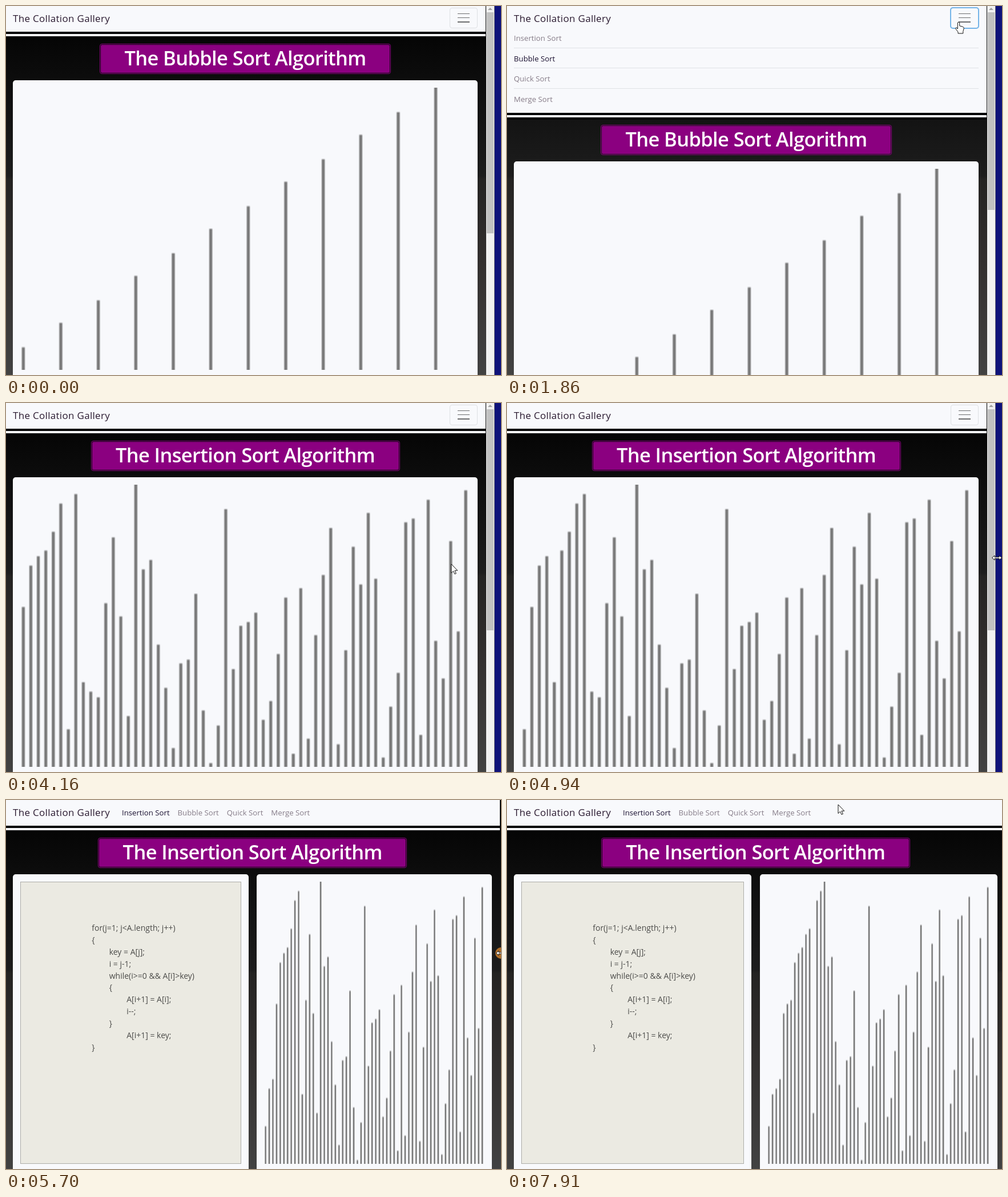
These frames come from a looping animation (867x646 px, 8 s). An HTML page with a canvas:

```html
<!DOCTYPE html>
<html lang="en">
<head>
<meta charset="utf-8">
<title>Sorting visualiser</title>
<style>
  * { box-sizing: border-box; }
  html, body { margin: 0; width: 100%; height: 100%; overflow: hidden; }
  body { font-family: "Open Sans", "Noto Sans", sans-serif; }
  #stage {
    position: relative; width: 867px; height: 646px; overflow: hidden;
    background: linear-gradient(#000, #1d1d1d 46%, #242322 47%, #33302f 70%, #424242);
  }
  #page { position: absolute; left: 0; top: 0; height: 646px; overflow: hidden; }
  nav {
    position: relative; box-sizing: content-box; height: 45px; overflow: hidden;
    background: #f8f9fc; border-bottom: 12px double #000;
  }
  .brand {
    position: absolute; left: 12px; top: 0; line-height: 44px;
    font-size: 17px; letter-spacing: .3px; color: #2a1a30; white-space: nowrap;
  }
  .toggle {
    position: absolute; right: 14px; top: 3px; width: 49px; height: 36px;
    border: 1px solid #dee0e3; border-radius: 4px;
  }
  .toggle::before {
    content: ""; position: absolute; left: 13px; top: 9px; width: 21px; height: 16px;
    background: linear-gradient(#6c6c6e 1.5px, transparent 1.5px 7px, #6c6c6e 7px 8.5px,
                transparent 8.5px 14.5px, #6c6c6e 14.5px);
  }
  .focus .toggle { outline: 2px solid #74b4e8; outline-offset: -1px; }
  .links {
    position: absolute; left: 12px; right: 14px; top: 38px;
    font-size: 13.2px; color: #867c88; white-space: nowrap;
  }
  .links span { display: block; height: 35.6px; line-height: 36px; border-bottom: 1px solid #dfe2e6; }
  .links span:last-child { border: 0; }
  .links .active { color: #1a1030; }
  main { position: relative; }
  h1 {
    position: absolute; left: 0; right: 2px; top: 9px; height: 53px; margin: 0 auto;
    line-height: 43px; text-align: center; white-space: nowrap;
    font-size: 34.5px; font-weight: 600; letter-spacing: -.65px; color: #fff;
    background: #8b0080; background-clip: padding-box; border: 3px double #8b0080; border-radius: 4px;
  }
  .cards { position: absolute; left: 12.2px; right: 14px; top: 73px; display: flex; gap: 14.5px; }
  .card { flex: 1; min-width: 0; height: 560px; padding: 13px; background: #f8f9fc; border-radius: 5px; }
  canvas { display: block; width: 100%; height: 494px; }
  pre {
    margin: 0; height: 494px; padding: 70px 0 0 124px; overflow: hidden;
    font: 14px/20.87px "Open Sans", "Noto Sans", sans-serif; tab-size: 30.5px;
    color: #4c4c4a; background: #ebeae2; border: 1px solid #adada8;
  }
  .code { display: none; }
  .wide .code { display: block; }
  .wide .toggle { display: none; }
  .wide .links { left: 203px; top: 4px; display: flex; gap: 14px; }
  .wide .links span { border: 0; }
  #bar {
    position: absolute; top: 0; width: 45px; height: 646px; background: #f1f1f1;
    border-right: 30px solid #0e127a; box-shadow: inset -1px 0 #6a6a78;
  }
  #bar::before {
    content: ""; position: absolute; left: 3px; top: 3px;
    border: 4px solid transparent; border-top: 0; border-bottom: 4px solid #a0a0a0;
  }
  #thumb { position: absolute; left: 1px; top: 11px; width: 12px; background: #c1c1c1; }
  #cursor { position: absolute; left: 0; top: 0; overflow: visible; }
  #cursor path { fill: #fff; stroke: #111; stroke-width: 1; stroke-linejoin: round; }
</style>
</head>
<body>
<div id="stage">
  <div id="page">
    <nav>
      <div class="brand">The Collation Gallery</div>
      <div class="toggle"></div>
      <div class="links"><span>Insertion Sort</span><span>Bubble Sort</span><span>Quick Sort</span><span>Merge Sort</span></div>
    </nav>
    <main>
      <h1></h1>
      <div class="cards">
        <div class="card code"><pre>for(j=1; j&lt;A.length; j++)
{
	key = A[j];
	i = j-1;
	while(i&gt;=0 &amp;&amp; A[i]&gt;key)
	{
		A[i+1] = A[i];
		i--;
	}
		A[i+1] = key;
}</pre></div>
        <div class="card"><canvas width="300" height="150"></canvas></div>
      </div>
    </main>
  </div>
  <div id="bar"><div id="thumb"></div></div>
  <svg id="cursor" width="1" height="1">
    <circle r="10"/>
    <path id="arrow" d="M0 0V15.5L3.6 12.2 6 17.5 8.4 16.4 6 11.2H10.8Z"/>
    <path id="hand" d="M-1.7 1.2Q0-1 1.7 1.2V6.8L7.6 8.4Q9.4 9 9.2 11.5L7.8 16.5V20H-1V17.5L-5.4 11.5Q-4.8 9-3 10.3L-1.7 12Z"/>
    <path id="resize" d="M-8.5 0L-4-4V-1.2H4V-4L8.5 0 4 4V1.2H-4V4Z"/>
  </svg>
</div>
<script>
const LOOP = 8000, FIRST = 310, TICK = 110;
const OPEN_MENU = 1350, CLICK_LINK = 2820, LOADED = 3170, GRAB = 5040, RELEASE = 5810;
const WIDE = 860;

const $ = s => document.querySelector(s);
const page = $('#page'), nav = $('nav'), title = $('h1');
const links = document.querySelectorAll('.links span');
const bar = $('#bar'), thumb = $('#thumb'), cursor = $('#cursor'), halo = $('circle');
const ctx = $('canvas').getContext('2d');

// the shuffled data being sorted
const ranks = [43, 58, 34, 56, 50, 46, 45, 8, 18, 16, 15, 35, 49, 32, 11, 60, 42, 44, 26, 17,
  4, 22, 23, 37, 12, 1, 9, 55, 21, 30, 31, 33, 10, 14, 24, 36, 3, 38, 6, 28,
  41, 51, 5, 25, 47, 39, 54, 40, 2, 13, 20, 52, 53, 7, 57, 27, 19, 48, 29, 59];
const ramp = Array.from({ length: 12 }, (_, i) => i + 1);

// key points: time, then values
const swapKeys = [[LOADED, 0], [5480, 30], [5700, 34], [7460, 60], [7900, 63]];
const path = [[FIRST, 772, 622], [530, 802, 110], [970, 844, 1], [1300, 791, 28], [1850, 791, 28],
  [2400, 63, 58], [2510, 57, 56], [LOADED, 57, 56], [4160, 780, 282], [4820, 858, 271], [5480, 859, 271],
  [5700, 867, 268], [6590, 874, 268], [7020, 830, 613], [7460, 812, 148], [7900, 580, 8]];

const clamp = (v, lo, hi) => Math.min(hi, Math.max(lo, v));
const linear = p => p;
const smooth = p => p * p * (3 - 2 * p);

function at(keys, t, ease) {
  const n = keys.findIndex(k => k[0] > t);
  if (n === 0) return keys[0].slice(1);
  if (n < 0) return keys[keys.length - 1].slice(1);
  const a = keys[n - 1], b = keys[n], p = ease((t - a[0]) / (b[0] - a[0]));
  return a.slice(1).map((v, i) => v + (b[i + 1] - v) * p);
}

// insertion sort, stopped after a number of swaps
function partlySorted(swaps) {
  const a = ranks.slice();
  for (let j = 1; j < a.length; j++) {
    for (let i = j; i > 0 && a[i - 1] > a[i]; i--) {
      if (swaps-- <= 0) return a;
      [a[i - 1], a[i]] = [a[i], a[i - 1]];
    }
  }
  return a;
}

function drawBars(list) {
  const pitch = 300 / list.length, unit = 150 / list.length;
  ctx.clearRect(0, 0, 300, 150);
  ctx.fillStyle = '#787878';
  list.forEach((v, i) => {
    const h = Math.floor(v * unit);
    ctx.fillRect(i * pitch + 1, 150 - h, 2, h);
  });
}

function cursorKind(x, y) {
  if (x > 856) return 'resize';
  const onToggle = x > 777 && x < 827 && y < 39, onLink = x < 95 && y < 66;
  return onToggle || onLink ? 'hand' : 'arrow';
}

const during = (t, start, length) => t >= start && t < start + length;

function render(time) {
  const t = time < FIRST ? 0 : FIRST + TICK * Math.floor((time - FIRST) / TICK);
  const loaded = t >= LOADED;
  const w = clamp(841 + (t - 5480) * 0.1105, 840, 872.5), wide = w > WIDE;
  const open = loaded ? 0 : smooth(clamp((t - OPEN_MENU) / 350, 0, 1));

  page.style.width = w + 'px';
  page.className = (wide ? 'wide' : '') + (t >= OPEN_MENU && t < CLICK_LINK ? ' focus' : '');
  nav.style.height = 45 + 142 * open + 'px';
  links.forEach((a, i) => a.className = i === (loaded ? 0 : 1) ? 'active' : '');
  title.textContent = `The ${loaded ? 'Insertion' : 'Bubble'} Sort Algorithm`;
  title.style.width = (loaded ? 541 : 510) + 'px';

  bar.style.display = wide ? 'none' : '';
  bar.style.left = w + 1 + 'px';
  thumb.style.height = 387 - 41 * open + 'px';

  drawBars(loaded ? partlySorted(Math.round(at(swapKeys, t, linear)[0])) : ramp);

  const [x, y] = at(path, t, smooth), kind = cursorKind(x, y);
  cursor.style.display = t < FIRST ? 'none' : '';
  cursor.style.transform = `translate(${x}px, ${y}px)`;
  for (const name of ['arrow', 'hand', 'resize']) $('#' + name).style.display = name === kind ? '' : 'none';
  const pressed = during(t, OPEN_MENU, TICK) || during(t, CLICK_LINK, TICK) || during(t, GRAB, RELEASE - GRAB);
  halo.style.display = pressed ? '' : 'none';
  halo.setAttribute('fill', wide ? 'rgba(200,125,45,.85)' : 'rgba(255,255,0,.5)');
}

function loop() {
  render(performance.now() % LOOP);
  requestAnimationFrame(loop);
}
loop();
</script>
</body>
</html>
```
